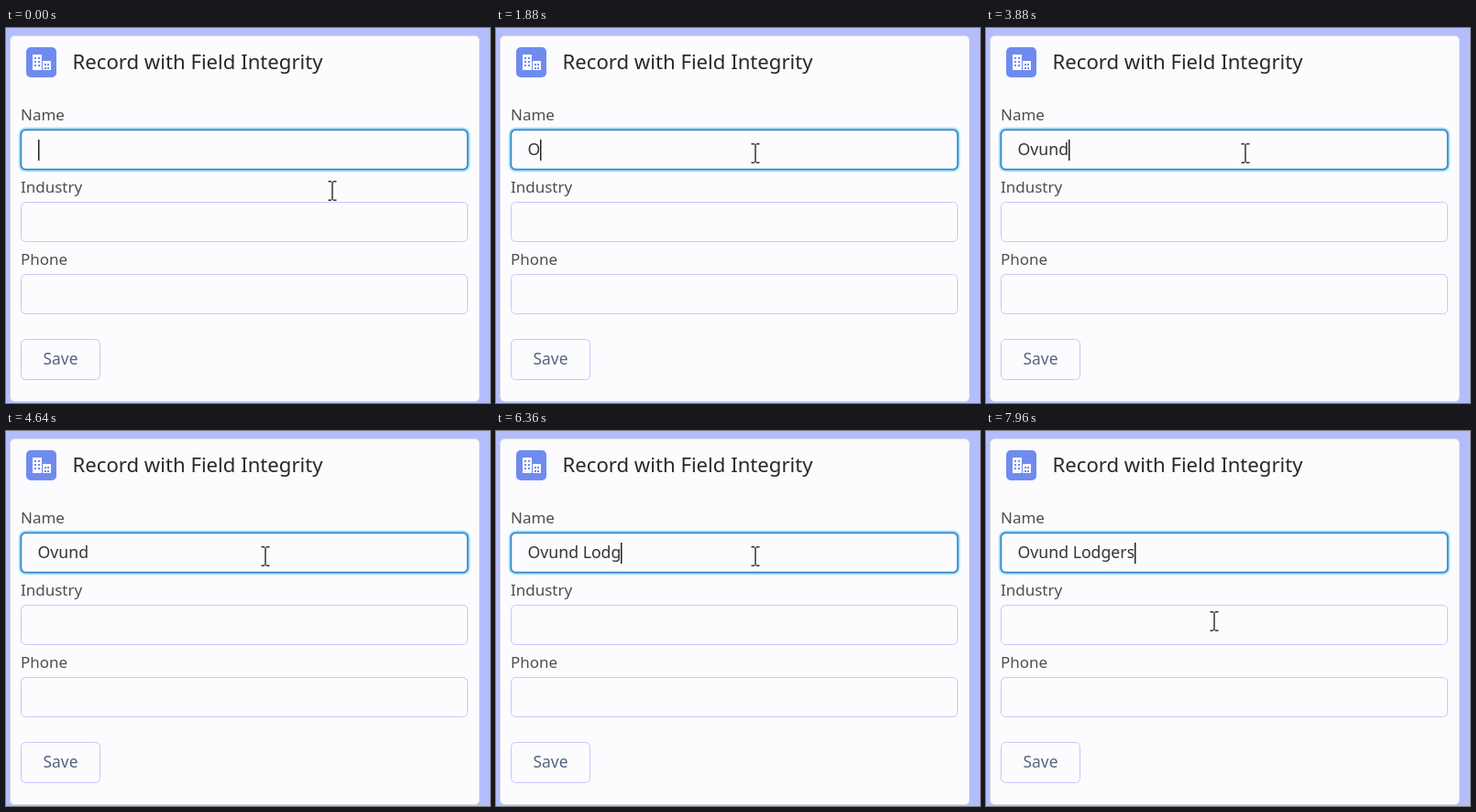
Write an HTML page with a canvas that moves like this. It is 528 px wide and 410 px high and loops after 8000 ms.

```html
<!DOCTYPE html>
<html lang="en">
<head>
<meta charset="utf-8">
<title>Record form</title>
<style>
  html, body { margin: 0; width: 100%; height: 100%; overflow: hidden; background: #b4bdfc; }
  canvas { display: block; }
</style>
</head>
<body>
<canvas id="stage" width="528" height="410"></canvas>
<script>
const ctx = document.getElementById('stage').getContext('2d');
const LOOP = 8000, BLINK = 500;
const BLUR_AT = 120, FOCUS_AT = 1240;
const TYPE_START = 1760, KEY_STEP = 430, WORD_PAUSE = 630;
const FIELD = { left: 16.5, width: 487, height: 43, pitch: 79, top: 111 };
const PAPER = '#fcfcff', OUTLINE = '#c8c5fb', ICON_BLUE = '#708bef';
const NAME = 'Ovund Lodgers';
const TEXT_LEFT = 34.5;

const keyTime = i => TYPE_START + i * KEY_STEP + (i > NAME.indexOf(' ') ? WORD_PAUSE : 0);

// Smooth progress from 0 to 1 between two times.
function ease(t, start, end) {
  const p = Math.min(1, Math.max(0, (t - start) / (end - start)));
  return p * p * (3 - 2 * p);
}

function rect(x, y, w, h, color) {
  ctx.fillStyle = color;
  ctx.fillRect(x, y, w, h);
}

function box(x, y, w, h, fill, stroke, lineWidth = 1) {
  ctx.beginPath();
  ctx.roundRect(x, y, w, h, 5);
  if (fill) { ctx.fillStyle = fill; ctx.fill(); }
  if (stroke) { ctx.strokeStyle = stroke; ctx.lineWidth = lineWidth; ctx.stroke(); }
}

function label(text, x, y, size, color) {
  ctx.font = `${size}px "Noto Sans", "Open Sans", sans-serif`;
  ctx.fillStyle = color;
  ctx.fillText(text, x, y);
}

function drawCard() {
  rect(0, 0, 528, 410, '#b4bdfc');
  box(4.5, 8.5, 512, 400, PAPER, '#d3d3df');
}

function drawBuilding(x, y, w, h, rows) {
  rect(x, y, w, h, PAPER);
  for (let row = 0; row < rows; row++) {
    for (const column of [2, w - 4]) rect(x + column, y + 3 + row * 4, 2, 2, ICON_BLUE);
  }
}

function drawIcon() {
  box(22, 21, 33, 33, ICON_BLUE);
  drawBuilding(29, 29, 10, 17, 3);
  drawBuilding(40, 36, 9, 10, 2);
}

function drawField(name, index, focused) {
  const { left, width, height, pitch } = FIELD;
  const top = FIELD.top + index * pitch + 0.5;
  label(name, 16, top - 10.5, 17, '#4b504b');
  if (focused) {
    box(left, top, width, height, null, '#c4eafc', 6);
    box(left, top, width, height, null, '#78c6ee', 3.5);
    box(left, top, width, height, PAPER, '#3684c3', 1.5);
  } else {
    box(left, top, width, height, PAPER, OUTLINE);
  }
}

function drawInput(t) {
  let count = 0;
  while (count < NAME.length && keyTime(count) <= t) count++;
  const text = NAME.slice(0, count);
  label(text, TEXT_LEFT, 139, 17.7, '#333633');

  const lastEvent = count ? keyTime(count - 1) : t >= FOCUS_AT ? FOCUS_AT : 0;
  if ((t - lastEvent) % (2 * BLINK) < BLINK) {
    const x = Math.round(TEXT_LEFT + ctx.measureText(text).width);
    rect(x, 122, 1.5, 23, '#222');
  }
}

function drawPointer(t) {
  const rise = ease(t, 160, 640), leave = ease(t, 7320, 7880);
  const x = Math.round(356 - 73 * rise - 34 * leave);
  const y = Math.round(178 - 41 * rise + 71 * leave);
  rect(x - 0.75, y - 10, 1.5, 20, '#333');
  for (const edge of [-11, 9.5]) {
    rect(x - 4.5, y + edge, 3.5, 1.5, '#333');
    rect(x + 1, y + edge, 3.5, 1.5, '#333');
  }
}

function draw(t) {
  const focused = t < BLUR_AT || t >= FOCUS_AT;
  drawCard();
  drawIcon();
  label('Record with Field Integrity', 72.5, 45, 22.15, '#282a28');
  ['Name', 'Industry', 'Phone'].forEach((name, i) => drawField(name, i, focused && i === 0));
  box(16.5, 340.5, 86, 44, PAPER, OUTLINE);
  label('Save', 40.5, 368, 17.4, '#56637f');
  if (focused) drawInput(t);
  drawPointer(t);
}

function tick() {
  draw(performance.now() % LOOP);
  requestAnimationFrame(tick);
}
tick();
</script>
</body>
</html>
```
